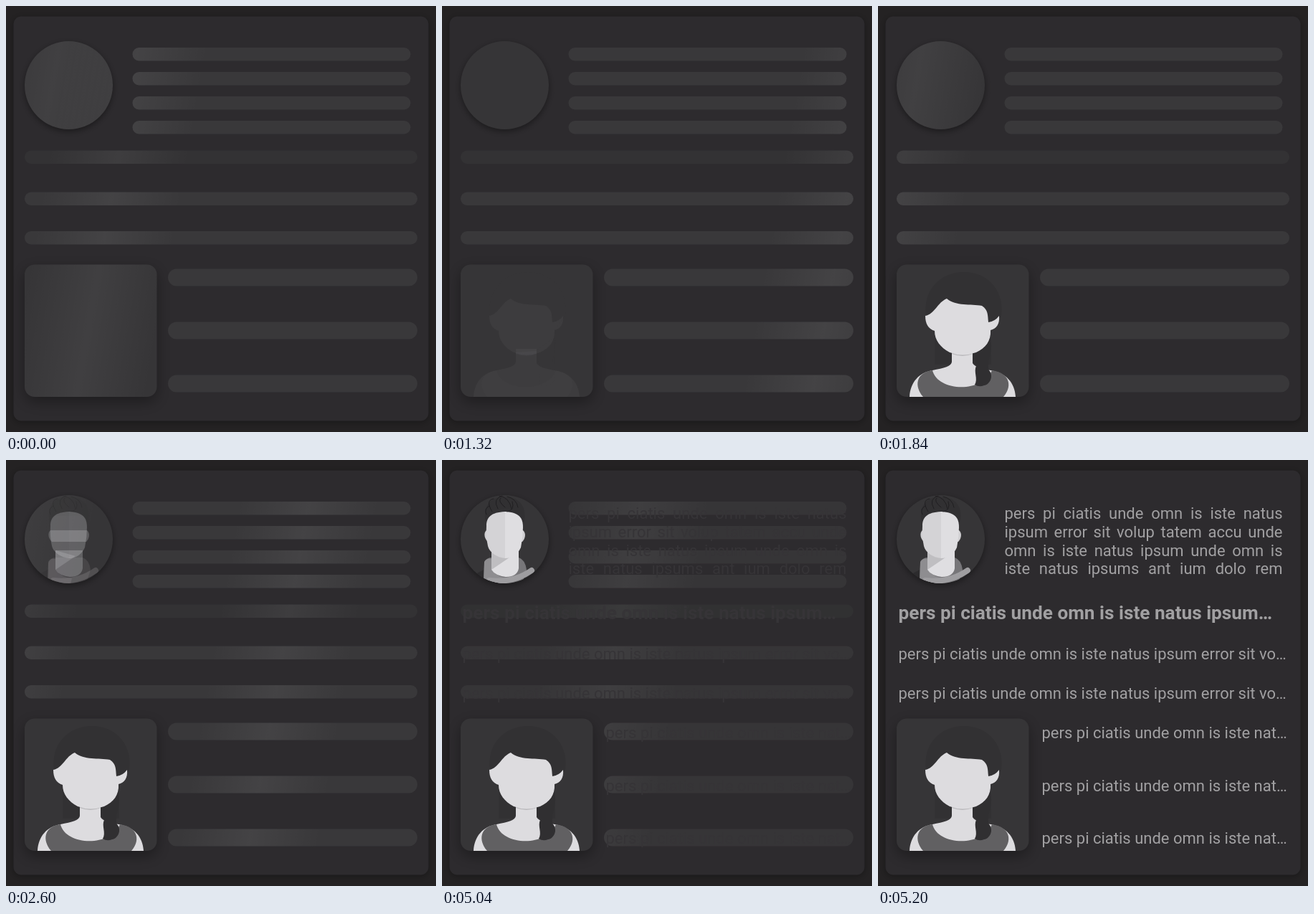
Write an HTML page with a canvas that moves like this. It is 600 px wide and 594 px high and loops after 5.56 s.

```html
<!DOCTYPE html>
<html lang="en">
<head>
<meta charset="utf-8">
<title>Skeleton loading card</title>
<style>
html, body { margin: 0; height: 100%; overflow: hidden; background: #242223; }
canvas { display: block; }
</style>
</head>
<body>
<canvas id="stage" width="600" height="594"></canvas>
<script>
const ctx = document.getElementById('stage').getContext('2d');
const LOOP = 5560, STEP = 40, SPEED = 1.2;
const TILT = Math.PI / 18, BEAM = 97;
// Beam positions at time 0, measured at y = 211
const BEAMS = [157, -1009, -2173, -2724, -3117, -4450, -5798];
const CARD = '#2d2b2e', TILE = '#363537';

const clamp = v => Math.min(1, Math.max(0, v));
const ramp = (t, from, to) => clamp((t - from) / (to - from));

function box(x, y, w, h, r) {
  const p = new Path2D();
  p.roundRect(x, y, w, h, r);
  return p;
}

function fill(shape, color) {
  ctx.fillStyle = color;
  ctx.fill(typeof shape === 'string' ? new Path2D(shape) : shape);
}

function raised(shape, color, dy, blur, alpha) {
  ctx.save();
  ctx.shadowColor = `rgba(0,0,0,${alpha})`;
  ctx.shadowOffsetY = dy;
  ctx.shadowBlur = blur;
  fill(shape, color);
  ctx.restore();
}

function shimmer(shape, t, strength, beams = BEAMS) {
  const dx = BEAM * Math.cos(TILT), dy = BEAM * Math.sin(TILT);
  for (const start of beams) {
    const x = start + SPEED * t;
    if (x < -130 || x > 760) continue;
    const g = ctx.createLinearGradient(x - dx, 211 - dy, x + dx, 211 + dy);
    g.addColorStop(0, 'rgba(255,255,255,0)');
    g.addColorStop(0.5, `rgba(255,255,255,${strength})`);
    g.addColorStop(1, 'rgba(255,255,255,0)');
    fill(shape, g);
  }
}

const circle = new Path2D();
circle.arc(87.5, 110.5, 61.5, 0, 7);
const square = box(26, 360.5, 184.5, 184.5, 14);
const card = box(10.5, 14.5, 579, 564, 11);

const bars = [
  ...[0, 1, 2, 3].map(i => [box(176.5, 58 + 34 * i, 388, 18.5, 9), '#39383a']),
  [box(26, 201.5, 548, 18.5, 9), '#333234'],
  [box(26, 259.5, 548, 18.5, 9), '#39383a'],
  [box(26, 314, 548, 18.5, 9), '#39383a'],
  ...[0, 1, 2].map(i => [box(226, 366.5 + 74 * i, 348, 24, 12), '#39383a'])
];

function woman() {
  const skin = '#dddcdf';
  fill('M67 433C62 398 85 371 120 371C157 371 177 402 172 432L157 452L158 500H79V453Z', '#323133');
  fill('M44 545C45 525 57 511 76 508C92 505 103 502 103 496V478H132V498C135 504 147 506 157 508C178 511 191 525 192 545Z', skin);
  fill('M103 483V485Q118 491 132 485V481Z', '#b9b8bb');
  fill('M63 545C50 530 53 511 76 508C83 538 147 540 159 508C186 512 187 532 175 545Z', '#616062');
  fill('M132 480L156 462C163 480 150 495 155 508C162 516 156 528 148 529Q141 532 135 528C140 520 133 510 137 502Q132 494 132 480Z', '#302f31');
  fill('M66 432C79 430 83 413 96 408C109 419 129 415 145 418C154 424 153 431 154 441Q163 440 169 432C170 444 165 450 157 452C158 467 150 477 137 483Q118 490 100 483C87 476 79 466 79 453C70 450 66 443 66 432Z', skin);
}

function man() {
  fill('M61 88C56 62 69 50 91 52C113 53 120 72 113 92L108 78H68Z', '#313032');
  fill('M45 160L60 152V172H45Z', '#2c2b2d');
  fill('M58 172L59 144Q62 136 69 136L107 136Q116 139 118 153L112 172Z', '#777679');
  fill('M58 172L59 142Q62 136 69 138V153Q78 164 92 165L90 173Z', '#8e8d90');
  fill('M69 126H107V151Q105 163 89 163Q74 161 69 153Z', '#dfdee1');
  fill('M69 126L97 134L69 153Z', '#bfbec1');
  fill('M62 98C57 102 60 111 64 114L112 114C116 110 118 102 113 98Z', '#d0cfd2');
  fill('M62 92C62 80 68 73 88 72V137C77 136 66 129 64 120Q61 106 62 92Z', '#d4d3d6');
  fill('M88 72C108 73 113 81 113 94Q113 108 110 122C106 131 98 137 88 137Z', '#dfdee1');
  ctx.lineCap = 'round';
  ctx.lineWidth = 8;
  ctx.strokeStyle = '#9e9da0';
  ctx.stroke(new Path2D('M66 168Q99 172 125 154'));
  ctx.lineWidth = 0.8;
  ctx.strokeStyle = '#1c1b1d';
  ctx.stroke(new Path2D('M62 76Q58 68 66 64M70 72Q60 56 72 54M78 68Q70 54 84 50M88 66Q77 57 82 53M97 68Q94 52 80 50M106 66Q104 54 91 51M91 72Q102 70 98 58'));
}

function portrait(clip, draw, alpha) {
  if (!alpha) return;
  ctx.save();
  ctx.clip(clip);
  ctx.globalAlpha = alpha;
  draw();
  ctx.restore();
}

function justify(line, x, y, width) {
  const words = line.split(' ');
  const sizes = words.map(w => ctx.measureText(w).width);
  const gap = (width - sizes.reduce((a, b) => a + b)) / (words.length - 1);
  words.forEach((w, i) => {
    ctx.fillText(w, x, y);
    x += sizes[i] + gap;
  });
}

function copy(t) {
  const k = 0.08 + 0.92 * ramp(t, 5040, 5200) ** 1.15;
  const [r, g, b] = [45, 43, 46].map((c, i) => Math.round(c + ([161, 160, 162][i] - c) * k));
  const start = 'pers pi ciatis unde omn is iste nat';
  ctx.fillStyle = `rgb(${r},${g},${b})`;
  ctx.font = '22px Roboto, sans-serif';
  [
    'pers pi ciatis unde omn is iste natus',
    'ipsum error sit volup tatem accu unde',
    'omn is iste natus ipsum unde omn is',
    'iste natus ipsums ant ium dolo rem'
  ].forEach((line, i) => justify(line, 176.5, 82 + 25.8 * i, 388));
  for (const y of [278, 333]) ctx.fillText(start + 'us ipsum error sit vo…', 28.5, y);
  for (const y of [388, 461.5, 535]) ctx.fillText(start + '…', 228.5, y);
  ctx.font = 'bold 26.2px Roboto, sans-serif';
  ctx.fillText(start + 'us ipsum…', 28.5, 221.5);
}

function draw(t) {
  ctx.fillStyle = '#242223';
  ctx.fillRect(0, 0, 600, 594);
  raised(card, CARD, 2, 10, 0.3);

  const womanIn = ramp(t, 1270, 1520) ** 2;
  const manIn = ramp(t, 2560, 2720);
  raised(circle, TILE, 3, 9, 0.4);
  shimmer(circle, t, 0.055 * (1 - manIn), [...BEAMS, 47]);
  portrait(circle, man, manIn);
  raised(square, TILE, 7, 20, 0.35);
  shimmer(square, t, 0.05 * (1 - womanIn));
  portrait(square, woman, womanIn);

  ctx.globalAlpha = 1 - ramp(t, 5020, 5130);
  for (const [shape, color] of bars) {
    fill(shape, color);
    shimmer(shape, t, 0.055);
  }
  ctx.globalAlpha = 1;
  if (t >= 5040) copy(t);
}

function tick() {
  const t = performance.now() % LOOP;
  draw(Math.floor(t / STEP) * STEP);
  requestAnimationFrame(tick);
}
tick();
</script>
</body>
</html>
```
